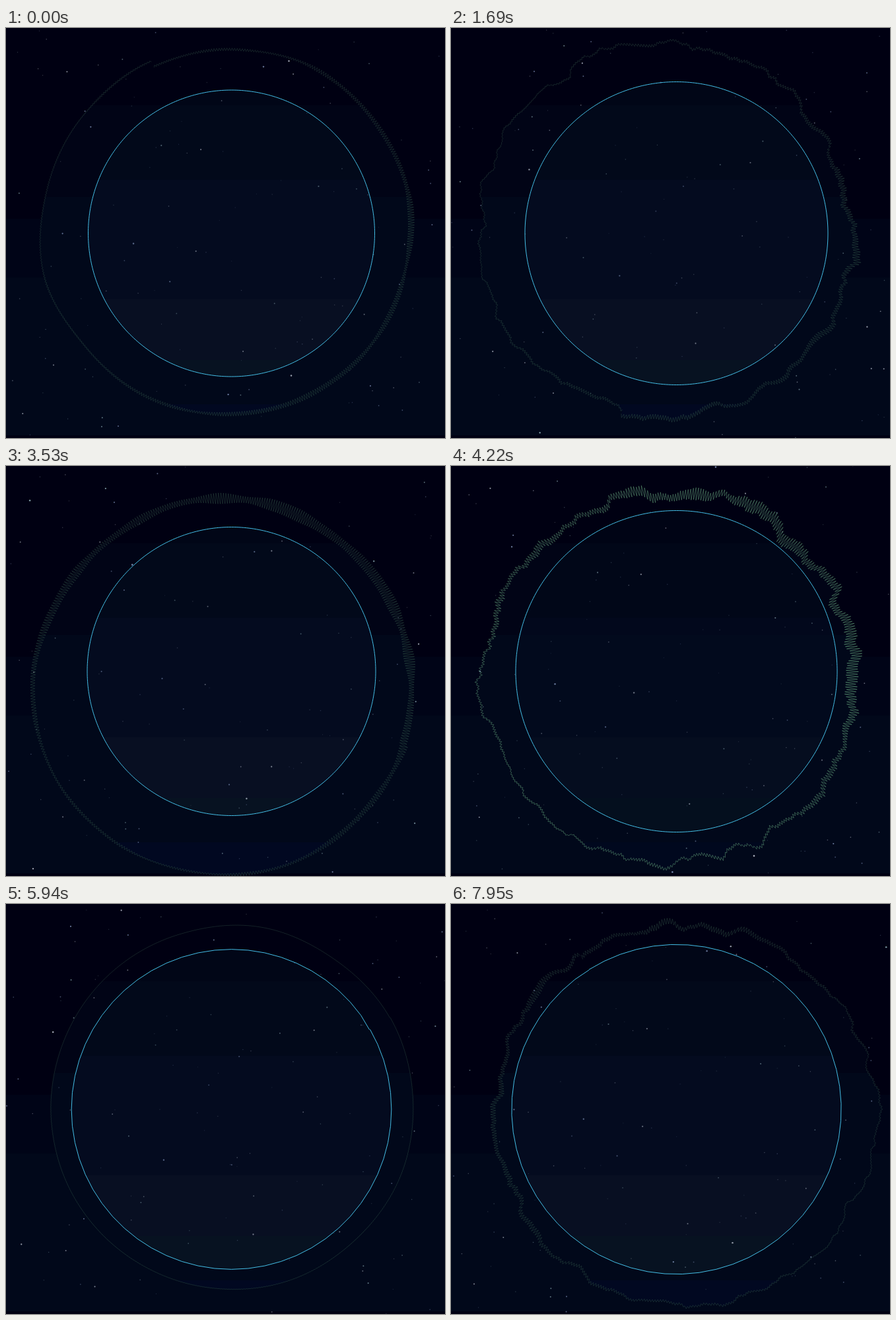
Animation, 665 px wide and 621 px high, one loop 8 s. Source, as an HTML page with a canvas:

```html
<!DOCTYPE html>
<html lang="en">
<head>
<meta charset="utf-8">
<title>Sound ring</title>
<style>
  html, body { margin: 0; width: 100%; height: 100%; overflow: hidden; background: #000012; }
  canvas { display: block; width: 665px; height: 621px; }
</style>
</head>
<body>
<canvas id="stage" width="665" height="621"></canvas>
<script>
const W = 665, H = 621, CX = 341.5, CY = 311;
const LOOP = 8000, TICKS = 129, POINTS = 900, TAU = Math.PI * 2;
const LOUD_TICK = 79, BULGE_TICK = 110;
const ctx = document.getElementById('stage').getContext('2d');

// radius: blue circle; mean, lean, toward: size and offset of the green trace;
// seam: where the trace starts (degrees); swing, rough, teeth: slow to fast ripples
const poses = [
  { tick: 0,   radius: 217,   seam: -115, mean: 279, lean: 10, toward: 190, swing: 6,  rough: 0,  teeth: 5 },
  { tick: 27,  radius: 229.5, seam: 467,  mean: 282, lean: 19, toward: 200, swing: 5,  rough: 9,  teeth: 6 },
  { tick: 57,  radius: 218.5, seam: 1103, mean: 285, lean: 28, toward: 115, swing: 4,  rough: 0,  teeth: 11 },
  { tick: 79,  radius: 268.5, seam: 1466, mean: 275, lean: 5,  toward: 150, swing: 12, rough: 19, teeth: 11 },
  { tick: 95,  radius: 242,   seam: 1770, mean: 275, lean: 3,  toward: 270, swing: 2,  rough: 0,  teeth: 0.3 },
  { tick: 110, radius: 240,   seam: 2050, mean: 270, lean: 13, toward: 340, swing: 12, rough: 28, teeth: 7 },
  { tick: 128, radius: 249.5, seam: 2398, mean: 289, lean: 17, toward: 390, swing: 4,  rough: 7,  teeth: 6 }
];

const stageBands = [[0, '#000012'], [289, '#000417'], [378, '#01081a'], [617, '#000012']];
const ringBands = [[117, '#010416'], [256, '#01081a']];
const quietRingBands = [[570, '#010821']];
const discBands = [[0, '#010617'], [117, '#02091a'], [230, '#040b1f'], [411, '#080f22'], [503, '#071221']];

const lerp = (a, b, k) => a + (b - a) * k;
const rad = deg => deg * Math.PI / 180;
const hash = (i, seed) => {
  const s = Math.sin(i * 127.1 + seed * 311.7) * 43758.5453;
  return s - Math.floor(s);
};

function noise(x, seed) {
  const i = Math.floor(x), f = x - i;
  return lerp(hash(i, seed), hash(i + 1, seed), f * f * (3 - 2 * f)) * 2 - 1;
}

function poseAt(tick) {
  let i = 0;
  while (i < poses.length - 2 && tick >= poses[i + 1].tick) i++;
  const a = poses[i], b = poses[i + 1], k = (tick - a.tick) / (b.tick - a.tick);
  const pose = {};
  for (const name in a) pose[name] = lerp(a[name], b[name], k);
  pose.glow = Math.max(0, 1 - Math.abs(tick - LOUD_TICK) / 16);
  pose.bulge = 3.5 * Math.exp(-(((tick - BULGE_TICK) / 12) ** 2));
  return pose;
}

function polar(count, seam, radiusAt) {
  const path = new Path2D();
  for (let i = 0; i <= count; i++) {
    const a = rad(seam) + i / count * TAU, r = radiusAt(i / count, a, i);
    path.lineTo(CX + r * Math.cos(a), CY + r * Math.sin(a));
  }
  return path;
}

function tracePath(pose) {
  const seed = pose.tick;
  return polar(POINTS, pose.seam, (u, a, i) => {
    const side = Math.cos(a - rad(pose.toward));
    const ripple = pose.swing * noise(u * 14, seed)
      + pose.rough * (noise(u * 62, seed + 1) + 0.35 * noise(u * 210, seed + 2));
    // Teeth alternate in and out, in bursts, taller on the near side
    const burst = (0.6 - 0.4 * side) * (0.7 + 0.3 * noise(u * 40, seed + 3));
    const tooth = (i % 2 ? 1 : -1) * pose.teeth * burst * lerp(1, 0.3 + hash(i, seed), pose.glow);
    return pose.mean + pose.lean * side + ripple + tooth;
  });
}

function circlePath({ radius, seam, bulge }) {
  if (bulge < 0.05) return polar(360, 0, () => radius);
  const facets = bulge < 1 ? 60 : 600;
  return polar(facets, seam, u => {
    const hook = u > 0.992 ? bulge * 1.4 : 0;
    return radius + bulge * (Math.abs(Math.cos(u * 30 * TAU)) - 0.5) - hook;
  });
}

function fillBands(bands, clip, alpha) {
  ctx.save();
  if (clip) ctx.clip(clip);
  ctx.globalAlpha = alpha;
  bands.forEach(([top, color], i) => {
    const bottom = i + 1 < bands.length ? bands[i + 1][0] : H;
    ctx.fillStyle = color;
    ctx.fillRect(0, top, W, bottom - top);
  });
  ctx.restore();
}

function drawStars(time) {
  for (let i = 0; i < 360; i++) {
    const z = 1.02 - (hash(i, 1) + time / 4000) % 1;
    const x = CX + (hash(i, 2) - 0.5) * 690 / z, y = CY + (hash(i, 3) - 0.5) * 640 / z;
    if (x < 0 || x > W || y < 0 || y > H) continue;
    const reach = Math.min(1, Math.hypot(x - CX, y - CY) / 300);
    ctx.globalAlpha = (0.2 + 0.75 * (1 - z)) * (0.5 + 0.5 * reach);
    ctx.fillStyle = ['#dfe6f2', '#9fb4e0', '#a8cbd4'][i % 3];
    ctx.beginPath();
    ctx.arc(x, y, 0.65 + 0.75 * (1 - z), 0, TAU);
    ctx.fill();
  }
  ctx.globalAlpha = 1;
}

function strokePath(path, color, alpha) {
  ctx.globalAlpha = alpha;
  ctx.strokeStyle = color;
  ctx.lineWidth = 1;
  ctx.stroke(path);
  ctx.globalAlpha = 1;
}

function draw(time) {
  const tick = Math.min(TICKS - 1, Math.floor((time + 8) * TICKS / LOOP));
  const pose = poseAt(tick), quiet = 1 - pose.glow;
  const trace = tracePath(pose), circle = circlePath(pose);
  fillBands(stageBands, null, 1);
  fillBands(ringBands, trace, 1);
  fillBands(quietRingBands, trace, quiet);
  fillBands(discBands, circle, quiet);
  drawStars(tick * LOOP / TICKS);
  strokePath(trace, '#8fe6a4', lerp(0.14, 0.8, pose.glow));
  strokePath(circle, '#48c8f0', 0.95);
}

const start = performance.now();
function frame() {
  draw((performance.now() - start) % LOOP);
  requestAnimationFrame(frame);
}
frame();
</script>
</body>
</html>
```
